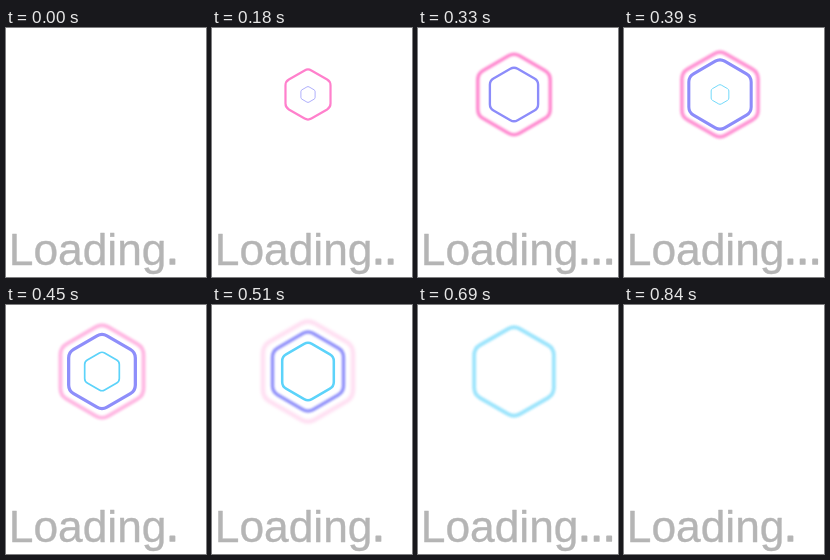
Recreate the animation shown at these times as an HTML page. Size 200 by 249 pixels, loop 1020 ms.

```html
<!DOCTYPE html>
<html lang="en">
<head>
<meta charset="utf-8">
<title>Loading</title>
<style>
  html, body { margin: 0; width: 100%; height: 100%; overflow: hidden; background: #fff; }
  svg { display: block; width: 100%; height: 100%; }
  path { fill: none; stroke-linejoin: round; }
  text {
    font: 44.3px "Liberation Sans", Arial, sans-serif;
    fill: #b5b5b5; stroke: #b5b5b5; stroke-linejoin: round;
  }
</style>
</head>
<body>
<svg viewBox="0 0 200 249">
  <g id="rings"></g>
  <text x="2.8" y="237" stroke-width=".4">Loading</text>
  <text id="dots" x="160.3" y="236.1" stroke-width="1.7">.</text>
</svg>
<script>
const LOOP = 1020, STEP = 30, CX = 96, CY = 66.5;

// Each key: time in ms, radius, opacity
const rings = [
  { color: '#ff80cc', keys: [[60, 6, 1], [180, 26, 1], [270, 39.6, 1], [390, 44, .85], [510, 52, .25], [570, 54, 0]] },
  { color: '#8c8cfa', keys: [[150, 4, 1], [180, 8.2, 1], [270, 19.7, 1], [390, 36, 1], [510, 41, .95], [600, 48, .45], [660, 53, 0]] },
  { color: '#5cd3fa', keys: [[360, 5, 1], [390, 10.2, 1], [510, 29.8, 1], [600, 41, .95], [690, 46, .6], [750, 52, .15], [780, 54, 0]] }
];

const group = document.getElementById('rings');
const dots = document.getElementById('dots');

for (const ring of rings) {
  ring.path = document.createElementNS('http://www.w3.org/2000/svg', 'path');
  ring.path.setAttribute('stroke', ring.color);
  group.append(ring.path);
}

const mix = (a, b, k) => a + (b - a) * k;

function sample(keys, t) {
  const i = keys.findIndex(key => key[0] > t);
  if (i < 1) return [0, 0];
  const [t0, r0, a0] = keys[i - 1], [t1, r1, a1] = keys[i];
  const k = (t - t0) / (t1 - t0);
  return [mix(r0, r1, k), mix(a0, a1, k)];
}

// Pointy-top hexagon with softened corners
function hexagon(r, cut = .15) {
  const corner = i => {
    const a = (i * 60 - 90) * Math.PI / 180;
    return [CX + r * Math.cos(a), CY + r * Math.sin(a)];
  };
  const toward = (p, q) => [mix(p[0], q[0], cut), mix(p[1], q[1], cut)];
  let d = '';
  for (let i = 0; i < 6; i++) {
    const p = corner(i);
    d += `${i ? 'L' : 'M'}${toward(p, corner(i - 1))}Q${p} ${toward(p, corner(i + 1))}`;
  }
  return d + 'Z';
}

function render(time) {
  const t = Math.floor(time % LOOP / STEP) * STEP;
  for (const { path, keys } of rings) {
    const [r, alpha] = sample(keys, t);
    path.style.display = alpha > 0 ? '' : 'none';
    if (!alpha) continue;
    const blur = Math.max(0, (r - 28) / 16);
    path.setAttribute('d', hexagon(r));
    path.setAttribute('stroke-width', r * .085);
    path.setAttribute('opacity', alpha);
    path.style.filter = blur ? `blur(${blur}px)` : 'none';
  }
  const beat = t % 420;
  dots.textContent = beat < 150 ? '.' : beat < 270 ? '..' : '...';
}

const start = performance.now();
function tick() {
  render(performance.now() - start);
  requestAnimationFrame(tick);
}
tick();
</script>
</body>
</html>
```
